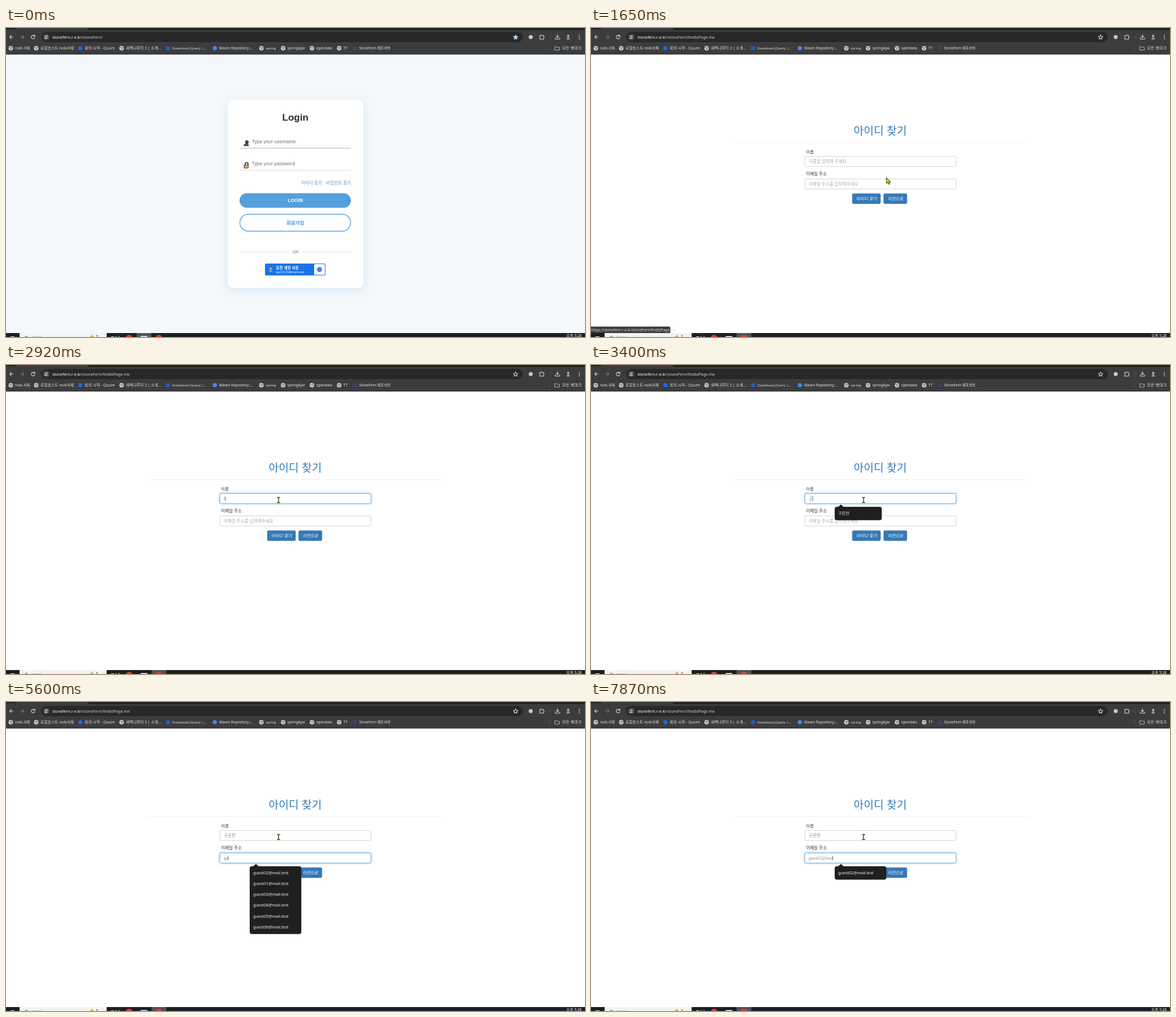
These frames come from a looping animation (1024x547 px, 8 s). An HTML page:

```html
<!DOCTYPE html>
<html lang="ko">
<head>
<meta charset="utf-8">
<title>아이디 찾기</title>
<style>
html, body { margin: 0; width: 100%; height: 100%; overflow: hidden; background: #fff; }
svg { display: block; width: 100vw; height: 100vh; }
text { font-family: "Noto Sans", "Noto Sans CJK KR", sans-serif; white-space: pre; }
.arial { font-family: "Liberation Sans", Arial, sans-serif; }
.kr { font-family: "Noto Sans CJK KR", "Noto Sans", sans-serif; }
.field { font: 7.6px "Liberation Serif", "Noto Sans CJK KR", serif; }
.bar { fill: #e3e3e3; }
.line { fill: none; stroke: #d4d4d4; stroke-width: 1.1; stroke-linecap: round; stroke-linejoin: round; }
.mid { text-anchor: middle; }
.end { text-anchor: end; }
.b { font-weight: 700; }
.item { fill: #f0f0f0; font-size: 7.2px; }
.box { fill: #fff; stroke: #c8c8c8; stroke-width: .8; }
.btn { fill: #337ab7; stroke: #2e6da4; stroke-width: .6; }
.glow { fill: #fff; stroke: #66afe9; stroke-width: .9; filter: drop-shadow(0 0 2px rgba(102,175,233,.7)); }
.card { fill: #fff; filter: drop-shadow(0 4px 8px rgba(70,140,190,.16)); }
</style>
</head>
<body>
<svg viewBox="0 0 1024 547" preserveAspectRatio="none">
<defs>
  <symbol id="globe" viewBox="0 0 8 8" overflow="visible">
    <circle cx="4" cy="4" r="4" fill="#dcdcdc"/>
    <path d="M1 2.6 3.4 3.2 4.2 4.8 3.2 6.6M4.6 .8 5 2.4 7 3M5.2 5.8 6.6 4.8" fill="none" stroke="#3c3c3c" stroke-width="1"/>
  </symbol>
  <symbol id="avatar" viewBox="0 0 8 10" overflow="visible">
    <circle cx="4" cy="3" r="2" fill="#d9c08a"/>
    <path d="M1 9.5 2 5.5h4l1 4z" fill="#6f9fc4"/>
    <path d="M2 1.6h4L5.2.2H2.8z" fill="#4d5a50"/>
  </symbol>
</defs>

<!-- login page -->
<g id="login">
  <rect y="47" width="1024" height="494" fill="#f4f8fb"/>
  <rect class="card" x="392" y="127" width="240" height="333" rx="9"/>
  <text class="arial b mid" x="511.7" y="164.3" font-size="17.07" fill="#2e2e33">Login</text>
  <g class="arial" font-size="8.53" fill="#757575">
    <text class="arial" x="434.7" y="204">Type your username</text>
    <text class="arial" x="434.7" y="243">Type your password</text>
  </g>
  <path d="M413.5 212.7H610M413.5 252H610" stroke="#d9d9d9"/>
  <path id="underline" d="M413.5 212.7H610" stroke="#b9b8d6"/>
  <g stroke="#222" stroke-width=".8">
    <path d="M420.5 208.6q.2-3 3.5-3.6h3q1.8 1 2.3 3.6z" fill="#55585e"/>
    <circle cx="426" cy="202" r="2.8" fill="#44474d"/>
    <path d="M423 242v-1.2a2.6 2.6 0 0 1 5.2 0v1.2" fill="none" stroke-width="1.5"/>
    <path d="M421 242.2h7.6v5.8h-7.6z" fill="#e5a52f"/>
  </g>
  <g fill="#4f9ddb">
    <text class="kr" x="522" y="276.8" font-size="7.6">아이디 찾기</text>
    <text class="kr end" x="610" y="276.8" font-size="7.5">비밀번호 찾기</text>
    <path id="linkline" d="M522 278.4H559" stroke="#4f9ddb" stroke-width=".7"/>
  </g>
  <rect x="413" y="292.5" width="197" height="25.8" rx="12.9" fill="#54a0dd"/>
  <text class="arial b mid" x="511.7" y="308.2" font-size="8.53" fill="#fff">LOGIN</text>
  <rect x="413.6" y="329.6" width="196" height="30" rx="15" fill="#fff" stroke="#4596d6" stroke-width="1.2"/>
  <text class="kr b mid" x="511.7" y="348" font-size="8.5" fill="#4596d6">회원가입</text>
  <path d="M413 396.3H502M522 396.3H610" stroke="#dfdfdf"/>
  <text class="arial mid" x="511.7" y="399.2" font-size="7.5" fill="#777">OR</text>
  <rect x="458" y="417" width="107" height="21" rx="2" fill="#1a73e8"/>
  <rect x="545" y="418" width="19" height="19" rx="1" fill="#fff"/>
  <circle cx="554.4" cy="427.6" r="4.6" fill="#4285f4"/>
  <use href="#avatar" x="464" y="422.5" width="8" height="10"/>
  <text class="kr b" x="477.5" y="427" font-size="6.6" fill="#fff">온찬 계정 사용</text>
  <text x="477.5" y="434.2" font-size="5.7" fill="#fff">pqr0123@mail.test</text>
</g>

<!-- find-id page -->
<g id="find">
  <rect y="47" width="1024" height="494" fill="#fff"/>
  <text class="kr mid" x="511.5" y="188.5" font-size="19.3" fill="#337ab7">아이디 찾기</text>
  <path d="M252 202.8H772" stroke="#eee"/>
  <g fill="#333" font-weight="500">
    <text class="kr" x="380.5" y="221.6" font-size="7.3">이름</text>
    <text class="kr" x="380.5" y="261.4" font-size="7.5">이메일 주소</text>
  </g>
  <rect class="box" x="378.2" y="227.4" width="267.3" height="17.8" rx="2"/>
  <rect class="box" x="378.2" y="267.2" width="267.3" height="17.8" rx="2"/>
  <rect class="glow" id="nameGlow" x="378.2" y="227.4" width="267.3" height="17.8" rx="2"/>
  <rect class="glow" id="mailGlow" x="378.2" y="267.2" width="267.3" height="17.8" rx="2"/>
  <text class="field" id="name" x="385" y="239"></text>
  <text class="field" id="mail" x="385" y="278.7"></text>
  <path id="caret" stroke="#333" stroke-width=".7"/>
  <path id="compose" stroke="#777" stroke-width=".5"/>
  <rect class="btn" x="462.2" y="293.2" width="49.8" height="17.8" rx="2"/>
  <rect class="btn" x="517.7" y="293.2" width="41" height="17.8" rx="2"/>
  <g fill="#fff" font-style="italic">
    <text class="kr mid" x="487.3" y="304.8" font-size="7.6">아이디 찾기</text>
    <text class="kr mid" x="538.3" y="304.8" font-size="7.4">이전으로</text>
  </g>
  <g id="menu"></g>
</g>

<g id="status">
  <path d="M0 528.5h138q2.3 0 2.3 2.3v9.7H0z" fill="#3c3c3c"/>
  <text x="1" y="536.6" font-size="6.45" fill="#dcdcdc">https://stonefern.r-e.kr/stoneFern/findIdPage.me</text>
</g>

<!-- browser bars -->
<rect width="1024" height="47" fill="#3c3c3c"/>
<path d="M0 0h18v2H0zM145 0h879v3.4H148q-3 0-3-3.4z" fill="#1f2020"/>
<rect x="62" y="7" width="852" height="18" rx="9" fill="#282828"/>
<circle cx="71.2" cy="16" r="6.5" fill="#3c3c3c"/>
<g class="line">
  <path d="M12.8 16H6.8m2.6-2.8L6.6 16l2.8 2.8"/>
  <path d="M25.5 16h6m-2.6-2.8 2.8 2.8-2.8 2.8" stroke="#777"/>
  <path d="M50.7 14.4a3.2 3.2 0 1 0 .3 2.6M51 12.5v2.3h-2.3"/>
  <path d="M68 14.2h2.5M73 14.2h1.2M68 17.9h1.2M72 17.9h2.2"/>
  <circle cx="71.8" cy="14.2" r="1"/><circle cx="70.4" cy="17.9" r="1"/>
  <path id="star" d="m901.3 12.2 1.2 2.6 2.8.3-2.1 1.9.6 2.8-2.5-1.4-2.5 1.4.6-2.8-2.1-1.9 2.8-.3z"/>
  <path d="M944 13.2h2.2q.6-2 1.8 0h2.8v2.4q2 .8 0 1.8v2.4H944v-2.2q1.6-1 0-2z"/>
  <path d="M975.3 11.8v5m-2.2-2 2.2 2.2 2.2-2.2M971.5 17.5v2.2h7.6v-2.2"/>
  <path d="M970.8 33h2.8l1 1.1h4v4.9h-7.8z" stroke-width=".8"/>
  <path d="M962 12v8M961.5 32v8" stroke="#5c5c5c" stroke-width=".7"/>
</g>
<circle cx="928" cy="16" r="3.6" fill="#c8c8c8"/>
<use href="#avatar" x="990.3" y="11" width="8" height="10"/>
<g fill="#d8d8d8"><circle cx="1014" cy="12.8" r=".9"/><circle cx="1014" cy="16" r=".9"/><circle cx="1014" cy="19.2" r=".9"/></g>
<text x="82" y="18.6" font-size="6.95" fill="#cfcfcf"><tspan fill="#fff" font-weight="500">stonefern.r-e.kr</tspan><tspan id="path"></tspan></text>
<g id="bookmarks" class="bar"></g>
<text class="bar end" x="1018" y="38.3" font-size="7.1">모든 북마크</text>

<!-- taskbar -->
<rect y="540" width="1024" height="7" fill="#1b1f24"/>
<rect x="8" y="546" width="7" height="1" fill="#fff"/>
<rect x="24" y="540" width="154" height="7" fill="#f3f3f3"/>
<circle cx="36" cy="548" r="2.4" fill="none" stroke="#555"/>
<path d="M46 546.5h18" stroke="#aaa" stroke-dasharray="3 1.5"/>
<path d="m148 547 4-4 3 4z" fill="#e8a83a"/><circle cx="161" cy="545" r="1.2" fill="#d8392f"/>
<path d="M186 546.5h5M194 546h2M199 546h2" stroke="#e4e4e4"/>
<rect id="activeTask" y="540" width="26" height="7" fill="#50545a"/>
<circle cx="217.7" cy="549" r="6" fill="#e23a30"/>
<rect x="238" y="545.5" width="12" height="2" fill="#fff"/>
<circle cx="270.5" cy="549" r="6" fill="#e23a30"/>
<text class="end" x="1018" y="547.2" font-size="6.6" fill="#fff">오후 5:28</text>

<g id="cursor" stroke="#1d2400" stroke-width=".9" stroke-linejoin="round">
  <path id="arrow" d="M0 0V10.5L2.5 8.2 4.2 12 5.9 11.2 4.2 7.6H7.4z" fill="#c6e000"/>
  <path id="hand" d="M-1.2 0q1-.9 2 0v4.2l4.4 1.2q1.2.5 1 2L5.2 11.4H.2L-3.6 7.2q.2-1.6 2.4 0z" transform="translate(0 -2.5)" fill="#c6e000"/>
  <circle id="halo" r="4.6" fill="#ffec2e" stroke="none"/>
  <path id="beam" d="M-2.8-4.6h2L0-4l.8-.6h2M-2.8 4.6h2L0 4l.8.6h2M0-4V4" fill="none" stroke="#3c4a0c" stroke-width="1.5"/>
</g>
</svg>
<script>
const LOOP = 8000, NAV = 1480, CLICK = 2060, NEXT_FIELD = 4140;
const $ = id => document.getElementById(id);
const clamp = v => Math.max(0, Math.min(1, v));
const ramp = (t, start, length) => clamp((t - start) / length);
const show = (id, on) => { $(id).style.display = on ? '' : 'none'; };
const latest = (steps, t) => steps.findLast(step => step[0] <= t);

// Each bookmark: x, label, font size, icon colour (globe when absent)
const bookmarks = [
  [4.5, 'nolk.서재', 6.3], [49.5, '로컬호스트 nolk서재', 6.75],
  [127.5, '회의 시작 - Quum', 6.9, '#1769e8'], [200.5, '새벽나루터 3 | 소개...', 6.8],
  [282.5, 'Download jQuery |...', 6.15, '#1f5fc0'], [365.3, 'Maven Repository:...', 6.2, '#4386ee'],
  [447.7, 'spring', 6.1], [486.2, 'springAjax', 6.2], [537.2, 'opendata', 6.2],
  [585.3, 'TT', 6.2], [613, 'StoneFern 배포서버', 6.3, '#34446b']
];
$('bookmarks').innerHTML = bookmarks.map(([x, label, size, color]) =>
  (color ? `<circle cx="${x + 4}" cy="35.8" r="3.8" fill="${color}"/>`
         : `<use href="#globe" x="${x}" y="31.8" width="8" height="8"/>`) +
  `<text x="${x + 11.6}" y="38.2" font-size="${size}">${label}</text>`).join('');

const nameSteps = [
  [CLICK, ''], [2870, 'r'], [2930, 'rn'], [3050, 'rnd'], [3250, ''], [3400, '구'],
  [3610, '궁'], [3690, '구오'], [3770, '구온'], [3850, '구온ㅊ'], [3930, '구온차'], [4000, '구온찬']
];
const mailSteps = [
  [NEXT_FIELD, ''], [4470, 'ㅕ'], [4570, 'ㅕㄴ'], [4670, 'ㅕㄴㄷ'], [4930, 'ㅕㄴ'], [5130, 'ㅕ'], [5260, ''],
  [5460, 'g'], [5540, 'gu'], [5680, 'gue'], [5860, 'gues'], [6650, 'guest'], [6980, 'guest0'],
  [7050, 'guest02'], [7400, 'guest02@'], [7670, 'guest02@m'], [7770, 'guest02@ma'], [7870, 'guest02@mai']
];
const names = ['A클래스 강사', '안녕하요', 'a', '1234', '초롱이 강사', '다른반강사'];
const mails = [2, 1, 3, 4, 5, 6].map(n => `guest0${n}@mail.test`);
const menuSteps = [
  [0, []], [CLICK, names], [2870, []], [3400, ['구온찬']], [3610, []], [3770, ['구온찬']], [3850, []],
  [5460, mails], [6650, mails.slice(0, 2)], [7400, mails.slice(0, 1)]
];

function drawMenu(items, top, width) {
  const height = 19.25 * items.length + 4.5;
  $('menu').innerHTML = items.length ? `<path d="M436 ${top + 1}l6-5 6 5z" fill="#1f1f1f"/>
    <rect x="431" y="${top}" width="${width}" height="${height}" rx="4" fill="#1f1f1f"/>` +
    items.map((label, i) => `<text class="item" x="437" y="${top + 14 + 19.25 * i}">${label}</text>`).join('') : '';
}

function drawField(id, value, placeholder) {
  $(id).textContent = value || placeholder;
  $(id).setAttribute('fill', !value ? '#aaa' : /[ㅏ-ㅣ]/.test(value) ? '#555' : '#8a8a8a');
}

function drawCaret(t) {
  const inMail = t >= NEXT_FIELD;
  const [since, value] = latest(inMail ? mailSteps : nameSteps, t) || [t, ''];
  const y = inMail ? 272 : 232;
  const width = value ? $(inMail ? 'mail' : 'name').getComputedTextLength() : 0;
  const x = 385.3 + width;
  $('caret').setAttribute('d', `M${x} ${y + .5}v8`);
  show('caret', t >= CLICK && Math.floor((t - since) / 530) % 2 === 0);
  $('compose').setAttribute('d', `M${x - 7} ${y + 8.4}h6.6`);
  show('compose', /[ㄱ-힣]$/.test(value));
}

function drawCursor(t) {
  const arrive = 1 - (1 - ramp(t, 70, 820)) ** 2;
  const leave = ramp(t, 1520, 360);
  const ease = leave * leave * (3 - 2 * leave);
  const x = 981 - 441 * arrive - 58 * ease;
  const y = 521 - 245 * arrive - 37 * ease;
  $('cursor').setAttribute('transform', `translate(${x} ${y})`);
  const beam = t >= 1790, hand = t >= 870 && t < NAV;
  show('cursor', t >= 70);
  show('beam', beam);
  show('hand', hand);
  show('arrow', !beam && !hand);
  show('halo', t >= 2000 && t < 2140);
}

function draw(t) {
  const found = t >= NAV, hover = t >= 930;
  show('login', !found);
  show('find', found);
  show('linkline', hover);
  show('status', hover && t < 1920);
  $('underline').style.opacity = 1 - ramp(t, 70, 200);
  $('path').textContent = '/stoneFern/' + (found ? 'findIdPage.me' : '');
  $('star').setAttribute('fill', found ? 'none' : '#a8d1fb');
  $('star').setAttribute('stroke', found ? '#d4d4d4' : '#a8d1fb');
  $('activeTask').setAttribute('x', t < 1300 ? 231 : 257.5);
  if (found) {
    drawField('name', (latest(nameSteps, t) || [0, ''])[1], '이름을 입력해 주세요');
    drawField('mail', (latest(mailSteps, t) || [0, ''])[1], '이메일 주소를 입력해주세요');
    const swap = ramp(t, NEXT_FIELD, 150);
    $('nameGlow').style.opacity = ramp(t, CLICK, 140) * (1 - swap);
    $('mailGlow').style.opacity = swap;
    drawMenu(latest(menuSteps, t)[1], t < NEXT_FIELD ? 251 : 290.7, t < NEXT_FIELD ? 83.3 : 91.3);
    drawCaret(t);
  }
  drawCursor(t);
}

const start = performance.now();
function tick() {
  draw((performance.now() - start) % LOOP);
  requestAnimationFrame(tick);
}
tick();
</script>
</body>
</html>
```
